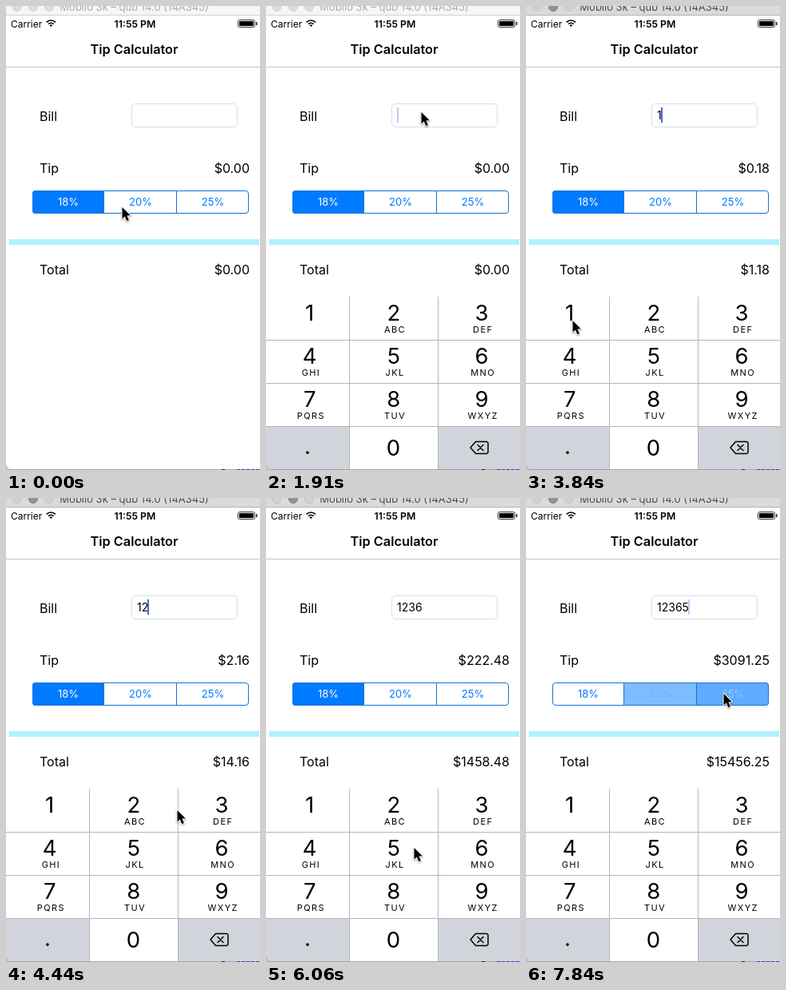
An HTML page with a canvas for the animation above (7.99 s loop, 318 px wide and 581 px high).

```html
<!DOCTYPE html>
<html lang="en">
<head>
<meta charset="utf-8">
<title>Tip Calculator</title>
<style>
  html, body { margin: 0; width: 100%; height: 100%; overflow: hidden; background: #fff; }
  canvas { display: block; width: 318px; height: 581px; }
</style>
</head>
<body>
<canvas id="stage"></canvas>
<script>
const W = 318, H = 581, LOOP = 7990;
const FIRST_TICK = 428, TICK = 148, LAST_TICK = 50;
const BLUE = '#007aff', KEY_GRAY = '#d1d5db', LINE = '#b4b6ba';

const canvas = document.getElementById('stage');
const ctx = canvas.getContext('2d');
const ratio = window.devicePixelRatio || 1;
canvas.width = W * ratio;
canvas.height = H * ratio;

// Pointer stops: tick, x, y
const PATH = [
  [-1, 145, 252], [3, 188, 117], [5, 194, 133], [16, 194, 133],
  [21, 58, 394], [23, 58, 394], [25, 160, 392], [26, 160, 392],
  [28, 268, 390], [29, 268, 390], [32, 254, 433], [35, 254, 433],
  [38, 185, 438], [40, 185, 438], [44, 180, 236], [45, 180, 236],
  [48, 247, 245]
];
const FOCUS = 6, ACTIVATE = 21;
const PRESSES = [[22, '1'], [26, '2'], [29, '3'], [33, '6'], [39, '5']];
const RATES = [18, 20, 25];
const CHOICES = [[-99, 0], [44, 1], [50, 2]];
const SEGMENTS = [33, 123, 214, 304];
const COLUMNS = [0, 105, 216, 318];
const KEY_CENTERS = [54.7, 159.8, 270];
const LETTERS = ['', 'ABC', 'DEF', 'GHI', 'JKL', 'MNO', 'PQRS', 'TUV', 'WXYZ'];

function rect(x, y, w, h, color) {
  ctx.fillStyle = color;
  ctx.fillRect(x, y, w, h);
}

function text(value, x, y, size, { color = '#000', align = 'left', weight = 400, spacing = 0 } = {}) {
  ctx.font = `${weight} ${size}px Inter, sans-serif`;
  ctx.letterSpacing = spacing + 'px';
  ctx.textAlign = align;
  ctx.fillStyle = color;
  ctx.fillText(value, x, y);
  ctx.letterSpacing = '0px';
}

function outline(x, y, w, h, r, color) {
  ctx.beginPath();
  ctx.roundRect(x, y, w, h, r);
  ctx.strokeStyle = color;
  ctx.lineWidth = 1;
  ctx.stroke();
}

function polygon(points) {
  ctx.beginPath();
  points.forEach(([x, y]) => ctx.lineTo(x, y));
  ctx.closePath();
}

function pointerAt(tick) {
  const next = PATH.findIndex(stop => stop[0] > tick);
  if (next === 0) return PATH[0].slice(1);
  if (next < 0) return PATH[PATH.length - 1].slice(1);
  const [t0, x0, y0] = PATH[next - 1];
  const [t1, x1, y1] = PATH[next];
  const p = (tick - t0) / (t1 - t0);
  const e = p * p * (3 - 2 * p);
  return [Math.round(x0 + (x1 - x0) * e), Math.round(y0 + (y1 - y0) * e)];
}

function stateAt(tick) {
  const typed = PRESSES.filter(([at]) => at <= tick);
  const bill = typed.map(([, digit]) => digit).join('');
  const past = CHOICES.filter(([at]) => at <= tick);
  const [chosenAt, chosen] = past[past.length - 1];
  const previous = past.length > 1 ? past[past.length - 2][1] : -1;
  const age = tick - chosenAt;
  const levels = [0, 0, 0];
  if (previous >= 0) levels[previous] = [0.5, 0.13][age] || 0;
  levels[chosen] = [0.63, 0.9][age] || 1;
  const tip = Number(bill) * RATES[chosen] / 100;
  const pressed = PRESSES.find(([at]) => at === tick);
  return {
    bill, tip, levels,
    total: Number(bill) + tip,
    pressed: pressed ? pressed[1] : '',
    caret: caretAlpha(tick, typed.length ? typed[typed.length - 1][0] : FOCUS)
  };
}

function caretAlpha(tick, since) {
  const age = tick - since;
  if (age < 0) return 0;
  if (age < 4) return 1;
  return [0.5, 1, 1, 1, 0.35, 0, 0][age % 7];
}

function drawTitleBar(active) {
  rect(0, 0, W, 11, active ? '#dadada' : '#f6f6f6');
  rect(0, 11, W, 1, active ? '#b4b4b4' : '#d3d3d3');
  [13.5, 34, 54].forEach((x, i) => {
    ctx.beginPath();
    ctx.arc(x, 1, 5.5, 0, Math.PI * 2);
    ctx.fillStyle = !active ? '#dddddd' : i === 1 ? '#929292' : '#d0d0d0';
    ctx.fill();
    ctx.strokeStyle = !active ? '#d0d0d0' : i === 1 ? '#848484' : '#c4c4c4';
    ctx.lineWidth = 1;
    ctx.stroke();
  });
  text('Mobilo 3k – qub 14.0 (14A345)', 160.5, 6, 13,
    { color: active ? '#4c4c4c' : '#acacac', align: 'center' });
}

function drawStatusBar() {
  text('Carrier', 6, 27, 12);
  text('11:55 PM', 161.5, 27, 12.3, { align: 'center', weight: 600 });
  ctx.strokeStyle = '#000';
  ctx.lineWidth = 1.7;
  for (const r of [4.7, 8]) {
    ctx.beginPath();
    ctx.arc(56.3, 26, r, -Math.PI * 0.75, -Math.PI * 0.25);
    ctx.stroke();
  }
  ctx.beginPath();
  ctx.moveTo(56.3, 26);
  ctx.arc(56.3, 26, 2.5, -Math.PI * 0.75, -Math.PI * 0.25);
  ctx.fillStyle = '#000';
  ctx.fill();
  outline(290.5, 17.5, 21, 9, 2, '#333');
  rect(292, 19, 18, 6, '#000');
  rect(313, 20, 1.5, 4, '#222');
}

function drawSegments(levels) {
  ctx.save();
  ctx.beginPath();
  ctx.roundRect(33, 231, 271, 29, 4);
  ctx.clip();
  RATES.forEach((rate, i) => {
    const left = SEGMENTS[i], width = SEGMENTS[i + 1] - left;
    const label = rate + '%';
    const center = [78, 168.5, 259][i];
    text(label, center, 250, 13, { color: BLUE, align: 'center' });
    ctx.globalAlpha = levels[i];
    rect(left, 231, width, 29, BLUE);
    text(label, center, 250, 13, { color: '#fff', align: 'center' });
    ctx.globalAlpha = 1;
  });
  rect(122, 231, 1, 29, '#1473d6');
  rect(213, 231, 1, 29, '#1473d6');
  ctx.restore();
  outline(33.5, 231.5, 270, 28, 3.5, '#1473d6');
}

function drawForm({ bill, tip, total, levels, caret }) {
  const money = value => '$' + value.toFixed(2);
  text('Tip Calculator', 160.5, 60, 16.3, { align: 'center', weight: 600 });
  rect(0, 76, W, 1, '#c6c6c6');

  text('Bill', 42, 143.5, 16);
  outline(157.5, 122.5, 132, 29, 4.5, '#dedede');
  text(bill, 164, 142, 14);
  const end = bill ? Math.round(163 + ctx.measureText(bill).width) : 164;
  ctx.globalAlpha = caret;
  rect(end, 127, 2, 19, '#426be2');
  ctx.globalAlpha = 1;

  text('Tip', 42, 208.5, 16);
  text(money(tip), 305, 208.5, 16, { align: 'right' });
  drawSegments(levels);
  rect(4, 292, 313, 7, '#b0f0fd');
  text('Total', 42, 335.5, 16);
  text(money(total), 305, 335.5, 16, { align: 'right' });
}

function drawDeleteIcon() {
  ctx.strokeStyle = '#000';
  ctx.lineWidth = 1.5;
  ctx.lineJoin = ctx.lineCap = 'round';
  polygon([[256, 553], [262.5, 545.5], [276.5, 545.5], [278, 547], [278, 559], [276.5, 560.5], [262.5, 560.5]]);
  ctx.stroke();
  ctx.beginPath();
  ctx.moveTo(265, 549.5); ctx.lineTo(272, 556.5);
  ctx.moveTo(272, 549.5); ctx.lineTo(265, 556.5);
  ctx.stroke();
}

function drawKeyboard(tick, pressed) {
  const rise = tick < FOCUS ? 0 : [0.3, 0.8, 0.97][tick - FOCUS] || 1;
  if (!rise) return;
  ctx.save();
  ctx.translate(0, Math.round((1 - rise) * 217));
  rect(0, 364, W, 216, '#fff');
  LETTERS.forEach((letters, i) => {
    const col = i % 3, top = 364 + Math.floor(i / 3) * 54;
    const digit = String(i + 1);
    if (digit === pressed) rect(COLUMNS[col], top, COLUMNS[col + 1] - COLUMNS[col], 54, KEY_GRAY);
    text(digit, KEY_CENTERS[col], top + 30, 27.5, { align: 'center' });
    text(letters, KEY_CENTERS[col] + 1.7, top + 45, 11, { align: 'center', spacing: 1.4 });
  });
  rect(0, 526, 104, 54, KEY_GRAY);
  rect(216, 526, 102, 54, KEY_GRAY);
  text('0', 159.5, 563, 27.5, { align: 'center' });
  text('.', 52, 561, 27.5, { align: 'center' });
  drawDeleteIcon();
  for (const y of [418, 472, 526]) rect(0, y, W, 1, LINE);
  for (const x of [104, 215]) rect(x, 364, 1, 216, LINE);
  ctx.restore();
}

function drawWindowEdge() {
  ctx.beginPath();
  ctx.moveTo(0, 575);
  ctx.quadraticCurveTo(0, 580, 5, 580);
  ctx.lineTo(W, 580);
  ctx.lineTo(W, H);
  ctx.lineTo(0, H);
  ctx.fillStyle = '#c9c9c9';
  ctx.fill();
  ctx.strokeStyle = '#a5a5a5';
  ctx.lineWidth = 1;
  ctx.beginPath();
  ctx.moveTo(0.5, 575);
  ctx.quadraticCurveTo(0.5, 580.5, 6, 580.5);
  ctx.lineTo(W, 580.5);
  ctx.stroke();
  rect(270, 580, 4, 1, '#222');
  for (let x = 289; x < W; x += 6) rect(x, 580, 4, 1, '#3434d0');
}

function drawPointer([x, y]) {
  ctx.save();
  ctx.translate(x + 0.5, y);
  polygon([[0, 0], [0, 14.5], [3.3, 11.4], [5.8, 17.2], [8.4, 16.1], [5.9, 10.5], [10.3, 10.3]]);
  ctx.lineJoin = 'round';
  ctx.lineWidth = 2;
  ctx.strokeStyle = '#fff';
  ctx.shadowColor = 'rgba(0,0,0,.4)';
  ctx.shadowBlur = 2 * ratio;
  ctx.shadowOffsetY = ratio;
  ctx.stroke();
  ctx.shadowColor = 'transparent';
  ctx.fillStyle = '#000';
  ctx.fill();
  ctx.restore();
}

function draw(now) {
  const time = now % LOOP;
  const tick = Math.max(-1, Math.min(LAST_TICK, Math.floor((time - FIRST_TICK) / TICK)));
  const state = stateAt(tick);
  ctx.setTransform(ratio, 0, 0, ratio, 0, 0);
  rect(0, 0, W, H, '#fff');
  drawTitleBar(tick >= ACTIVATE);
  drawStatusBar();
  drawForm(state);
  drawKeyboard(tick, state.pressed);
  drawWindowEdge();
  drawPointer(pointerAt(tick));
}

const start = performance.now();
function loop() {
  draw(performance.now() - start);
  requestAnimationFrame(loop);
}
loop();
</script>
</body>
</html>
```
